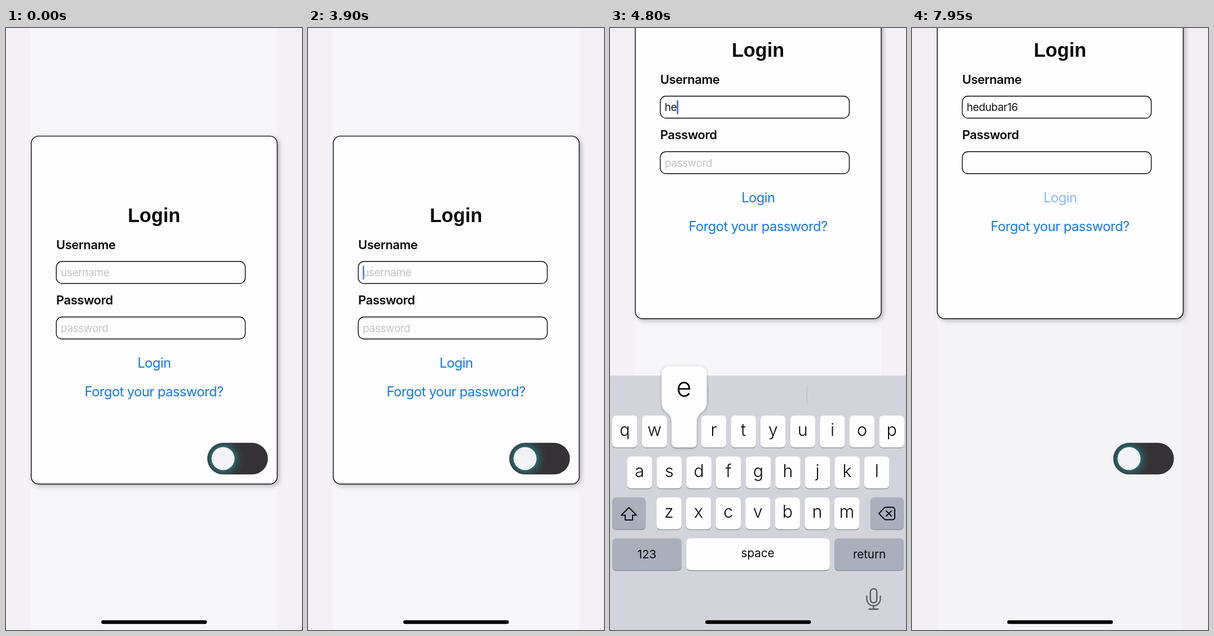
Animation of 525x1067 px, one loop 8 s. Source, as an HTML page with a canvas:

```html
<!DOCTYPE html>
<html lang="en">
<head>
<meta charset="utf-8">
<title>Login form</title>
<style>
  html, body { margin: 0; width: 100%; height: 100%; overflow: hidden; background: #f6f5f8; }
  canvas { display: block; width: 100%; height: 100%; }
</style>
</head>
<body>
<canvas id="stage"></canvas>
<script>
const W = 525, H = 1067, LOOP = 8000, STEP = 50;
const canvas = document.getElementById('stage');
const ctx = canvas.getContext('2d');
const dpr = window.devicePixelRatio || 1;
canvas.width = W * dpr;
canvas.height = H * dpr;

const UI = 'Inter, "Open Sans", sans-serif';
const HEAD = '"Liberation Sans", Arial, sans-serif';
const INK = '#0b0a0d', BLUE = '#1578e2', WHITE = '#fefdff';

// Timeline in ms
const TO_REGISTER = 1100, TO_LOGIN = 3000, KNOB_TIME = 300;
const FOCUS = 3850, KEYS_UP = 3912.6, CARD_UP = 3977.7;
const NUMBERS = 5480, KEYS_GONE = 6220, SECRET = 6550, PRESS = 7770;
const TYPED = [
  ['h', 4580], ['e', 4760], ['d', 4880], ['u', 5000], ['b', 5110],
  ['a', 5220], ['r', 5340], ['1', 5680], ['6', 5900]
];

const LETTERS = ['qwertyuiop', 'asdfghjkl', 'zxcvbnm'];
const SYMBOLS = ['1234567890', '-/:;()¥&@"', '.,?!\''];
const PITCH = 52.6, KEY_W = 44.5, KEY_H = 56.5, ROW = 72.5, KEYS_TOP = 616;

const clamp = x => Math.min(1, Math.max(0, x));
const ease = x => (x = clamp(x), x * x * (3 - 2 * x));
const settle = ms => {
  const x = Math.max(0, ms) * 0.022;
  return 1 - (1 + x) * Math.exp(-x);
};

function box(x, y, w, h, r, fill, stroke, line = 1.4) {
  ctx.beginPath();
  ctx.roundRect(x, y, w, h, r);
  if (fill) { ctx.fillStyle = fill; ctx.fill(); }
  if (stroke) { ctx.strokeStyle = stroke; ctx.lineWidth = line; ctx.stroke(); }
}

function setFont(size, weight = 400, family = UI, track = -0.022) {
  ctx.font = `${weight} ${size}px ${family}`;
  ctx.letterSpacing = `${(size * track).toFixed(2)}px`;
}

function label(str, x, y, color = INK, align = 'left') {
  ctx.textAlign = align;
  ctx.fillStyle = color;
  ctx.fillText(str, x, y);
}

function line(points, close) {
  ctx.beginPath();
  points.forEach(([x, y]) => ctx.lineTo(x, y));
  if (close) ctx.closePath();
  ctx.stroke();
}

function background(t) {
  const dim = t >= KEYS_GONE;
  ctx.fillStyle = dim ? '#f1eff2' : '#f3f1f5';
  ctx.fillRect(0, 0, W, H);
  ctx.fillStyle = dim ? '#f4f3f6' : '#f6f5f8';
  ctx.fillRect(44, 0, 437, H);
}

function field(name, hint, y, value, caret) {
  setFont(22, 600);
  label(name, 89, y - 22);
  box(89.2, y + 0.3, 335.2, 39, 10, WHITE, INK);
  setFont(19);
  label(value || hint, 97, y + 26.5, value ? '#141316' : '#c4c3c8');
  if (caret) {
    const end = value ? ctx.measureText(value).width : 0;
    ctx.globalAlpha = caret;
    box(97 + end, y + 7.5, 2.6, 25, 1.3, '#3d68d2');
    ctx.globalAlpha = 1;
  }
}

function form(t) {
  const register = t >= TO_REGISTER && t < TO_LOGIN;
  const top = register ? 333 : 413.5;
  const value = TYPED.filter(k => t >= k[1]).map(k => k[0]).join('');
  const caret = t < FOCUS || t >= KEYS_GONE ? 0 : t < 3950 ? 0.85 : 1;

  setFont(34.2, 700, HEAD, 0);
  label(register ? 'Register' : 'Login', 262.5, top - 70, INK, 'center');
  field('Username', 'username', top, value, caret);
  field('Password', t >= SECRET ? '' : 'password', top + 98.5);
  if (register) {
    field('Password Confirm', 'password confirm', top + 197);
    field('Email', 'email', top + 295.5);
  }

  setFont(23.7);
  if (register) {
    label('Register', 262.8, 718.5, BLUE, 'center');
  } else {
    ctx.globalAlpha = 1 - 0.5 * ease((t - PRESS) / 180);
    label('Login', 262.8, 602, BLUE, 'center');
    ctx.globalAlpha = 1;
    label('Forgot your password?', 262.5, 652.5, BLUE, 'center');
  }
}

function card(t) {
  ctx.save();
  ctx.translate(0, -293 * settle(t - CARD_UP));
  ctx.save();
  ctx.shadowColor = 'rgba(0,0,0,0.3)';
  ctx.shadowBlur = 9 * dpr;
  ctx.shadowOffsetX = ctx.shadowOffsetY = 3 * dpr;
  box(44.8, 191.6, 436.2, 616.6, 13, WHITE);
  ctx.restore();
  box(44.8, 191.6, 436.2, 616.6, 13, null, INK);
  form(t);
  ctx.restore();
}

function toggle(t) {
  const on = ease((t - TO_REGISTER) / KNOB_TIME) - ease((t - TO_LOGIN) / KNOB_TIME);
  ctx.save();
  box(357, 735.3, 107.5, 56, 28, '#353235');
  ctx.clip();
  ctx.shadowColor = '#22b4c2';
  ctx.shadowBlur = 18 * dpr;
  ctx.beginPath();
  ctx.arc(385 + 51 * on, 763.2, 20.4, 0, 7);
  ctx.fillStyle = '#f3f2f7';
  ctx.fill();
  ctx.restore();
}

function cap(x, row, w, grey) {
  const y = 71 + ROW * row;
  box(x, y + 1.3, w, KEY_H, 7, '#898b91');
  box(x, y, w, KEY_H, 7, grey ? '#abafbb' : WHITE);
}

// Left edge, row and width of a character key
function keySpot(ch, rows) {
  const row = rows.findIndex(r => r.includes(ch));
  const i = rows[row].indexOf(ch);
  if (row === 2 && rows === SYMBOLS) return [82.3 + 73.75 * i, row, 65.5];
  const left = [4, rows === LETTERS ? 30.2 : 4, 82.3][row];
  return [left + PITCH * i, row, KEY_W];
}

function popup(ch, rows) {
  const [x, row, w] = keySpot(ch, rows);
  const y = 71 + ROW * row, r = 12;
  const l = Math.max(4, x - 17.7), right = l + 80;
  const top = y - 87.5, neck = y - 18, join = y + 12;
  ctx.save();
  ctx.shadowColor = 'rgba(0,0,0,0.25)';
  ctx.shadowBlur = 5 * dpr;
  ctx.shadowOffsetY = dpr;
  ctx.beginPath();
  ctx.moveTo(l + r, top);
  ctx.arcTo(right, top, right, neck, r);
  ctx.lineTo(right, neck - 6);
  ctx.bezierCurveTo(right, neck + 14, x + w, y - 8, x + w, join);
  ctx.arcTo(x + w, y + KEY_H, x, y + KEY_H, 7);
  ctx.arcTo(x, y + KEY_H, x, join, 7);
  ctx.lineTo(x, join);
  ctx.bezierCurveTo(x, y - 8, l, neck + 14, l, neck - 6);
  ctx.arcTo(l, top, l + r, top, r);
  ctx.fillStyle = WHITE;
  ctx.fill();
  ctx.restore();
  setFont(47, 350, UI, 0);
  label(ch, l + 39.5, y - (rows === LETTERS ? 34.5 : 31.5), INK, 'center');
}

function shiftIcon() {
  line([[33.5, 234], [47, 247.5], [40, 247.5], [40, 256], [27, 256], [27, 247.5], [20, 247.5]], true);
}

function deleteIcon() {
  ctx.beginPath();
  ctx.moveTo(477, 244.5);
  ctx.lineTo(486, 235);
  ctx.arcTo(487.5, 233.5, 490, 233.5, 3);
  ctx.arcTo(505, 233.5, 505, 244, 4);
  ctx.arcTo(505, 255.5, 490, 255.5, 4);
  ctx.arcTo(487.5, 255.5, 486, 254, 3);
  ctx.closePath();
  ctx.stroke();
  line([[490, 240], [499, 249]]);
  line([[499, 240], [490, 249]]);
}

function micIcon() {
  const grey = '#595a5f';
  box(461.8, 377.8, 11.4, 25, 5.7, null, grey, 2.3);
  ctx.beginPath();
  ctx.moveTo(455.5, 391);
  ctx.lineTo(455.5, 396);
  ctx.arc(467.5, 396, 12, Math.PI, 0, true);
  ctx.lineTo(479.5, 391);
  ctx.stroke();
  line([[467.5, 408], [467.5, 414]]);
  line([[459.5, 414], [475.5, 414]]);
}

function keyIcon() {
  ctx.fillStyle = '#1c1c1f';
  ctx.beginPath();
  ctx.arc(490, 23.5, 9, 0, 7);
  ctx.moveTo(492.2, 19.5);
  ctx.arc(490, 19.5, 2.2, 0, 7);
  ctx.fill('evenodd');
  ctx.beginPath();
  [[486.7, 30], [493.3, 30], [493.3, 34], [495.5, 36.5], [492.5, 39.5],
   [494, 42], [490, 46], [486.7, 42.5]].forEach(p => ctx.lineTo(...p));
  ctx.fill();
}

function suggestions(t) {
  ctx.fillStyle = '#bbbcc3';
  if (t >= TYPED[0][1] - 50) {
    ctx.fillRect(173.7, 17, 1.2, 33);
    ctx.fillRect(348.7, 17, 1.2, 33);
    return;
  }
  ctx.fillRect(452.5, 18, 1.2, 32);
  setFont(17, 400, 'Inter, "Noto Sans CJK TC", "Noto Sans CJK", sans-serif', 0);
  label('「nur.test」的密碼', 224, 28, INK, 'center');
  setFont(20);
  label('tobinaveld', 226, 51.5, INK, 'center');
  keyIcon();
}

function keyboard(t) {
  if (t < KEYS_UP || t >= KEYS_GONE) return;
  const rows = t < NUMBERS ? LETTERS : SYMBOLS;
  const letters = rows === LETTERS;
  ctx.save();
  ctx.translate(0, KEYS_TOP + 451 * (1 - settle(t - KEYS_UP)));
  ctx.fillStyle = '#d3d4db';
  ctx.fillRect(0, 0, W, H);
  suggestions(t);

  for (const ch of rows.join('')) {
    const [x, row, w] = keySpot(ch, rows);
    cap(x, row, w);
    setFont(letters ? 30.5 : 29, 350, UI, 0);
    const glyph = ch === '"' ? '″' : ch === '\'' ? '′' : ch;
    label(glyph, x + w / 2, 71 + ROW * row + (letters ? 36.3 : 39), INK, 'center');
  }

  cap(4, 2, 59.3, true);
  cap(461.8, 2, 59.3, true);
  cap(4, 3, 123, true);
  cap(135.3, 3, 254.5);
  cap(398, 3, 123, true);
  setFont(20.7, 400, UI, -0.005);
  label(letters ? '123' : 'ABC', 65.5, 324.3, INK, 'center');
  label('space', 262, 322, INK, 'center');
  label('return', 460, 324.3, INK, 'center');

  ctx.strokeStyle = INK;
  ctx.lineWidth = 2;
  ctx.lineJoin = ctx.lineCap = 'round';
  deleteIcon();
  if (letters) {
    shiftIcon();
  } else {
    setFont(16.5, 400, UI, 0);
    label('#+=', 33.5, 250, INK, 'center');
  }
  micIcon();

  const held = TYPED.filter(([ch, at]) => t >= at - 50 && t < at + 70).pop();
  if (held && rows.join('').includes(held[0])) popup(held[0], rows);
  ctx.restore();
}

function draw(t) {
  ctx.setTransform(dpr, 0, 0, dpr, 0, 0);
  background(t);
  card(t);
  toggle(t);
  keyboard(t);
  box(169, 1049.7, 187.3, 6.6, 3.3, '#000');
}

// The screen refreshes twenty times a second
const start = performance.now();
function tick() {
  const t = (performance.now() - start) % LOOP;
  draw(Math.floor(t / STEP) * STEP);
  requestAnimationFrame(tick);
}
tick();
</script>
</body>
</html>
```
